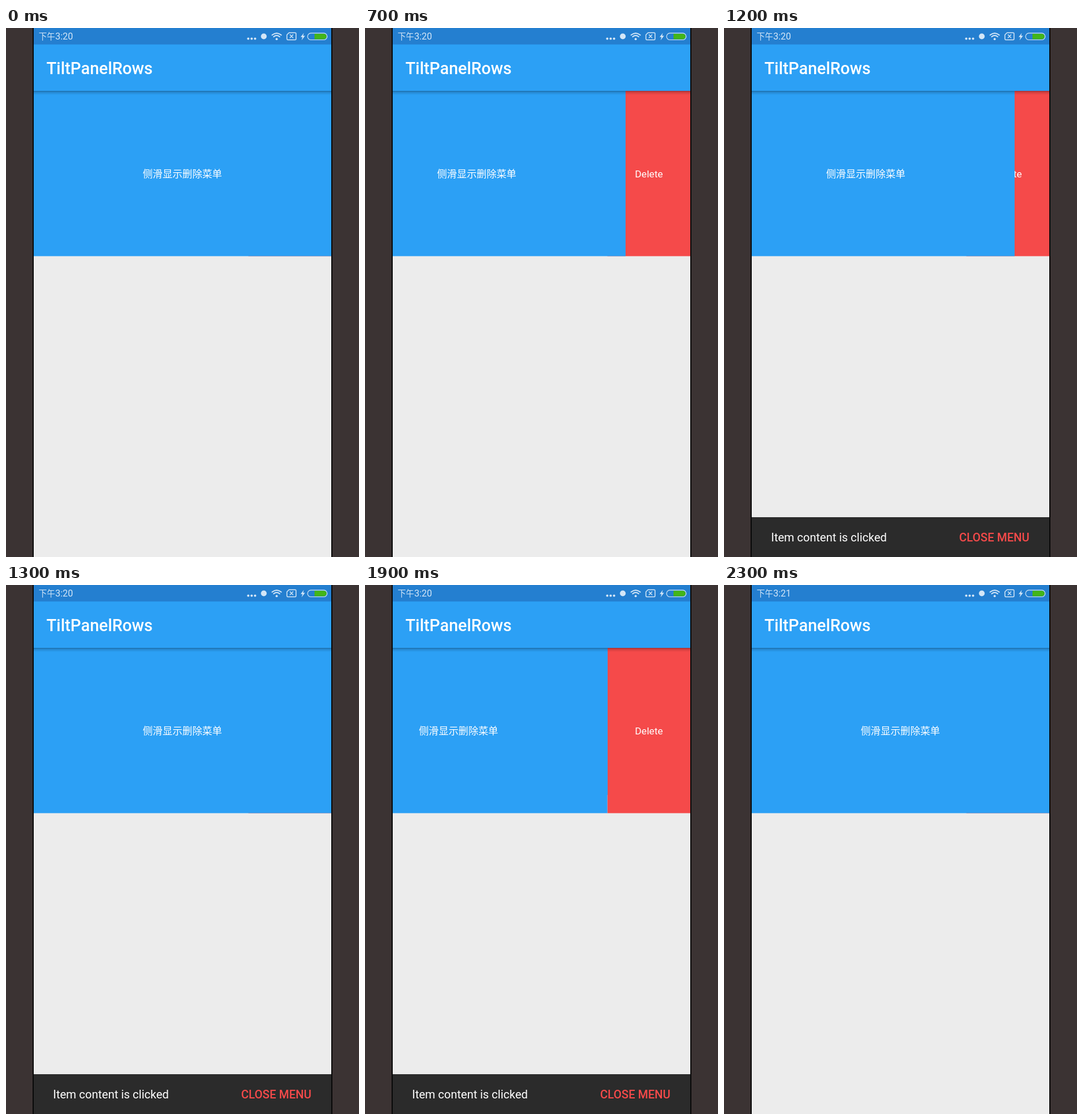
Recreate the animation shown at these times as an HTML page. Size 611 px wide and 917 px high, loop 2.4 s.

```html
<!DOCTYPE html>
<html lang="zh-CN">
<head>
<meta charset="utf-8">
<title>Swipe menu</title>
<style>
  html, body { margin: 0; width: 100%; height: 100%; overflow: hidden; background: #3b3333; }
  svg { display: block; width: 611px; height: 917px; }
  text { font-family: Roboto, 'Noto Sans CJK SC', 'Noto Sans CJK JP', 'Noto Sans CJK', sans-serif; fill: #fff; }
  .medium { font-weight: 500; }
  .status text { fill: #d3e6f7; }
  .line { fill: none; stroke: #d3e6f7; stroke-width: 1.5; stroke-linecap: round; stroke-linejoin: round; }
  .solid { fill: #d3e6f7; }

  .card, .snackbar, .before, .after { animation: 2400ms step-end infinite; }
  .card { animation-name: slide; }
  .snackbar { animation-name: notice; }
  .before { animation-name: leave; }
  .after { animation-name: enter; }

  /* The screen updates at most every 100 ms, so each pose is held. */
  @keyframes slide {
    0% { transform: translateX(0); }
    25% { transform: translateX(-30px); }
    29.16% { transform: translateX(-112px); }
    33.33% { transform: translateX(-143.5px); }
    50% { transform: translateX(-60px); }
    54.16% { transform: translateX(0); }
    75% { transform: translateX(-135.8px); }
    79.16% { transform: translateX(-143.5px); }
    87.5% { transform: translateX(-12px); }
    91.66%, 100% { transform: translateX(0); }
  }
  @keyframes notice {
    0% { visibility: hidden; }
    33.33% { visibility: visible; }
    87.5%, 100% { visibility: hidden; }
  }
  @keyframes leave {
    0% { visibility: visible; }
    95.83%, 100% { visibility: hidden; }
  }
  @keyframes enter {
    0% { visibility: hidden; }
    95.83%, 100% { visibility: visible; }
  }
</style>
</head>
<body>
<svg viewBox="0 0 611 917">
  <defs>
    <clipPath id="screen"><rect x="48" width="515" height="917"/></clipPath>
    <linearGradient id="shade" x2="0" y2="1">
      <stop offset="0" stop-opacity=".32"/>
      <stop offset=".4" stop-opacity=".13"/>
      <stop offset="1" stop-opacity="0"/>
    </linearGradient>
  </defs>

  <rect width="611" height="917" fill="#3b3333"/>
  <rect x="46" width="519" height="917" fill="#080808"/>

  <g clip-path="url(#screen)">
    <rect x="48" width="515" height="917" fill="#ececec"/>

    <rect x="419.5" y="109" width="143.5" height="286.5" fill="#f54a4a"/>
    <text x="491.5" y="259" font-size="17.2" text-anchor="middle">Delete</text>
    <g class="card">
      <rect x="48" y="109" width="515" height="286.5" fill="#2ca0f5"/>
      <text x="236.7" y="258.8" font-size="17.16">侧滑显示删除菜单</text>
    </g>

    <rect x="48" y="28" width="515" height="81" fill="#2ca0f5"/>
    <rect x="48" y="109" width="515" height="7" fill="url(#shade)"/>
    <text class="medium" x="70" y="80" font-size="28.6">TiltPanelRows</text>

    <g class="status">
      <rect x="48" width="515" height="28.5" fill="#247fd0"/>
      <text x="56.5" y="20" font-size="14.3">下午</text>
      <text class="before" x="85.2" y="20.3" font-size="16">3:20</text>
      <text class="after" x="85.2" y="20.3" font-size="16">3:21</text>

      <g class="solid">
        <circle cx="419.3" cy="18.6" r="2"/>
        <circle cx="425.2" cy="18.6" r="2"/>
        <circle cx="431.1" cy="18.6" r="2"/>
        <circle cx="446.2" cy="14.5" r="5"/>
        <circle cx="468.5" cy="19.2" r="1.9"/>
        <path d="M515.5 8.5 510 15.7h3.2l-1.6 5.6 6-7.7h-3.4z"/>
      </g>
      <g class="line">
        <path stroke-width="1.9" d="M460.5 12.2q8-6.6 16 0M463.2 15.2q5.3-4.2 10.6 0"/>
        <path d="M489.8 8.3H500.5q1.5 0 1.5 1.5v9.2q0 1.5-1.5 1.5h-12.7q-1.5 0-1.5-1.5V11.8zM491.7 11.7l5 5m0-5-5 5"/>
        <rect x="522" y="8.9" width="33.8" height="11.6" rx="5.8" stroke-width="1.2"/>
      </g>
      <path d="M534 10h16.2a4.7 4.7 0 0 1 0 9.4H534z" fill="#43b519"/>
    </g>

    <g class="snackbar">
      <rect x="48" y="848" width="515" height="69" fill="#2b2b2b"/>
      <text x="81.5" y="890" font-size="20">Item content is clicked</text>
      <text class="medium" x="528.5" y="890" font-size="20" text-anchor="end" style="fill:#f54a4a">CLOSE MENU</text>
    </g>
  </g>
</svg>
</body>
</html>
```
